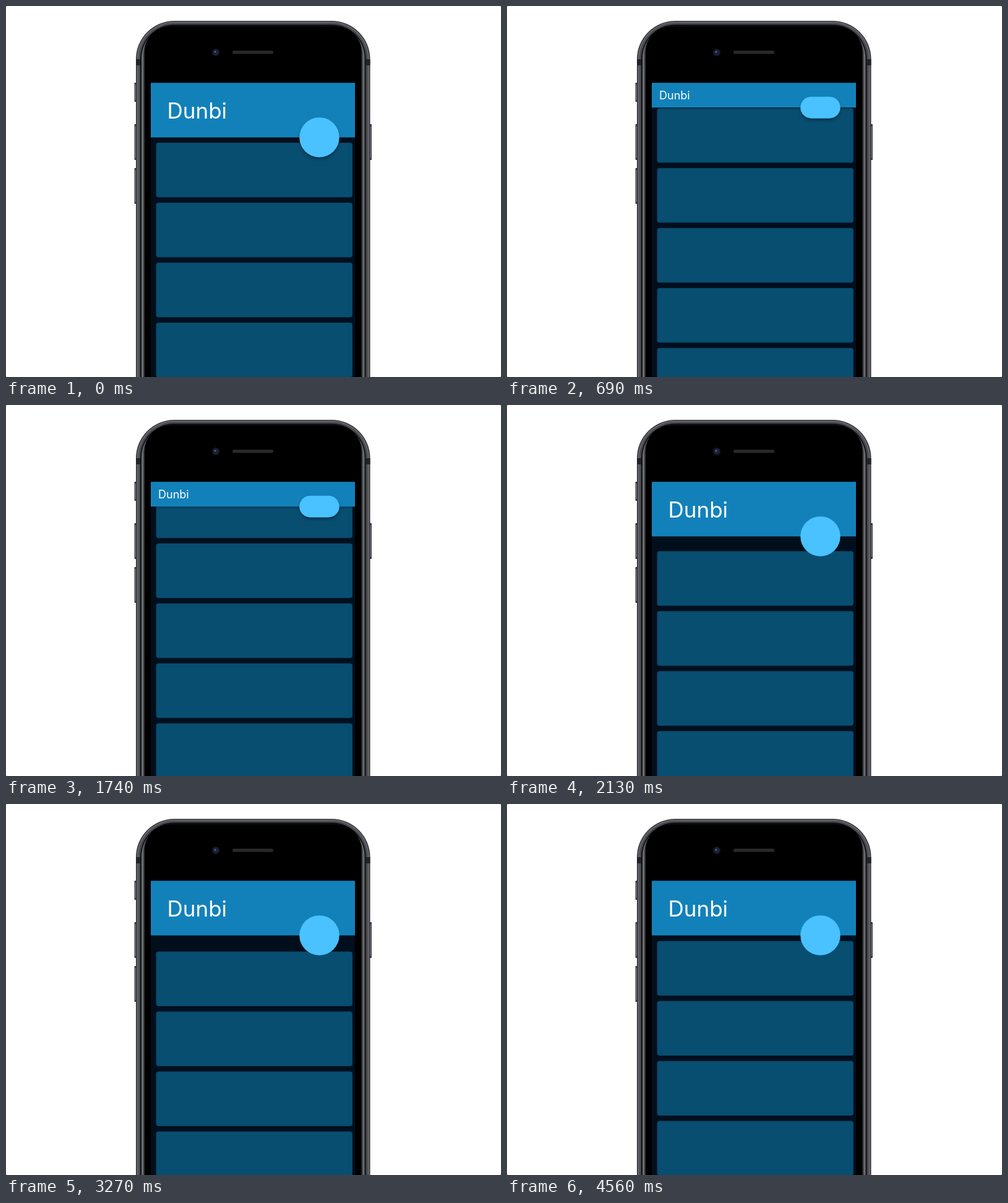
Write an HTML page with a canvas that moves like this. It is 800 px wide and 600 px high and loops after 4590 ms.

```html
<!DOCTYPE html>
<html lang="en">
<head>
<meta charset="utf-8">
<title>Collapsing header</title>
<style>
  html, body { margin: 0; width: 100%; height: 100%; overflow: hidden; background: #fff; }
  canvas { display: block; }
</style>
</head>
<body>
<canvas id="stage" width="800" height="600"></canvas>
<script>
const ctx = document.getElementById('stage').getContext('2d');
const LOOP = 4590, STEP = 30;

// Turning points of the list: [time in ms, scroll offset in px]
const swings = [[0, 0], [560, 69], [1080, -19], [1650, 102.5], [2180, -18],
                [2740, 56], [3270, -17.5], [3830, 70], [4360, -10], [LOOP, 0]];

const mix = (a, b, k) => a + (b - a) * k;

function scrollAt(t) {
  const i = swings.findIndex(([end]) => t < end);
  const [t0, a] = swings[i - 1], [t1, b] = swings[i];
  return mix(a, b, (1 - Math.cos(Math.PI * (t - t0) / (t1 - t0))) / 2);
}

function box(x, y, w, h, r, fill) {
  ctx.beginPath();
  ctx.roundRect(x, y, w, h, r);
  ctx.fillStyle = fill;
  ctx.fill();
}

function sideButton(x, y, h) {
  box(x, y, 4, h, 1, '#3b3c41');
  box(x + 1, y + 3, 2, h - 6, 1, '#72747a');
}

// One layer of the phone body, running past the bottom of the stage
function shell(inset, top, radius, fill) {
  box(210 + inset, top, 378.5 - 2 * inset, 700, radius, fill);
}

function drawPhone() {
  ctx.fillStyle = '#bbb';
  ctx.fillRect(0, 0, 800, 600);
  box(0, 0, 800, 600, 3, '#fff');

  sideButton(207.5, 124, 31);
  sideButton(207.5, 191, 58);
  sideButton(207.5, 262, 58);
  sideButton(587, 191, 58);

  shell(0, 24, 62, '#2b2c30');
  shell(1.3, 25, 61, '#606267');
  shell(4, 27.5, 58, '#48494e');
  shell(7, 30, 55, '#101012');
  // The black glass has a tighter corner, so the inner rim tapers off there.
  shell(9, 33, 51, '#6a6c70');
  shell(12, 33, 45, '#37383b');
  shell(14, 33, 41, '#000');
  for (const x of [210, 581.5]) {
    ctx.fillStyle = '#222327';
    ctx.fillRect(x, 86, 7, 10);
  }

  box(333, 69, 12, 12, 6, '#191b21');
  box(335.5, 71.5, 7, 7, 3.5, '#152449');
  box(336.5, 72.5, 3, 3, 1.5, '#4c65a0');
  box(366, 72.3, 66, 5.2, 2.6, '#292929');
}

function drawScreen(t) {
  const scroll = scrollAt(t);
  const collapse = Math.min(1, Math.max(0, scroll / 48));
  const edge = mix(212.4, 164.2, collapse);
  const shade = t < 560 ? 1 : collapse;

  ctx.save();
  ctx.beginPath();
  ctx.rect(234, 124, 330, 476);
  ctx.clip();
  ctx.fillStyle = '#010f1d';
  ctx.fillRect(234, 124, 330, 476);
  for (let i = 0; i < 7; i++) {
    const y = 221 + i * 97 - scroll;
    box(242.5, y, 317.5, 88.5, 4, '#074565');
    box(243.5, y + 1, 315.5, 86.5, 3, '#084e71');
  }

  ctx.shadowColor = `rgba(0,0,0,${0.3 * shade})`;
  ctx.shadowBlur = 4;
  ctx.shadowOffsetY = 2;
  box(234, 124.3, 330, edge - 124.3, 0, '#1281ba');
  ctx.shadowColor = 'transparent';

  ctx.fillStyle = '#fff';
  ctx.font = `${mix(35, 18, collapse)}px Inter, sans-serif`;
  ctx.fillText('Dunbi', mix(260.5, 246, collapse), mix(182, 151, collapse));

  const height = mix(64.5, 35, collapse);
  ctx.shadowColor = `rgba(0,0,0,${0.35 * shade})`;
  ctx.shadowOffsetY = 3;
  box(474.2, edge - height / 2, 64.5, height, height / 2, '#49c2ff');
  ctx.restore();
}

function frame(now) {
  const t = Math.floor((now % LOOP) / STEP) * STEP;
  drawPhone();
  drawScreen(t);
  requestAnimationFrame(frame);
}
requestAnimationFrame(frame);
</script>
</body>
</html>
```
